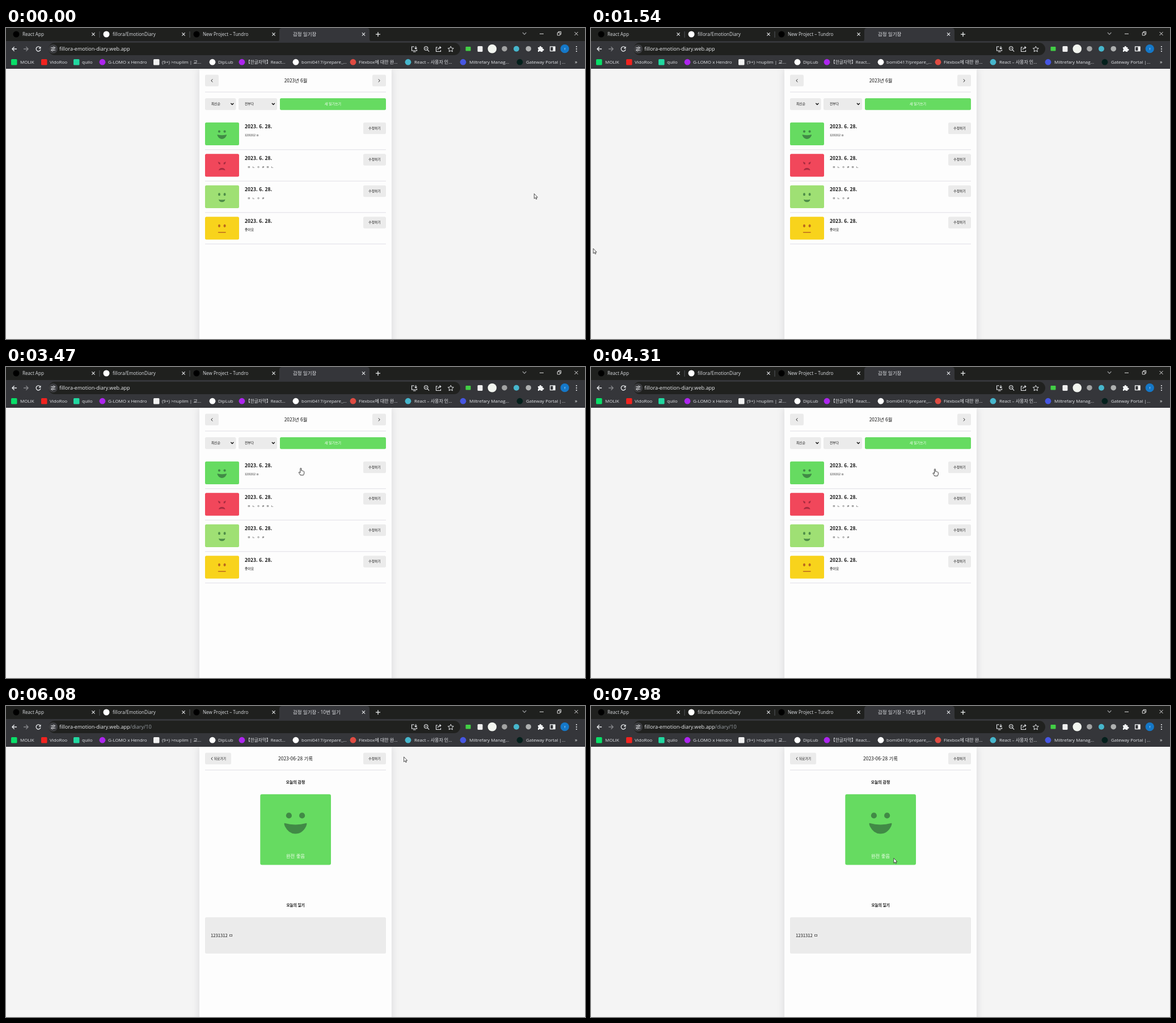
An HTML page that plays this animation: 1021x549 px, repeating every 8 s.

```html
<!DOCTYPE html>
<html lang="ko">
<head>
<meta charset="utf-8">
<title>감정 일기장</title>
<style>
  html, body { margin: 0; width: 100%; height: 100%; overflow: hidden; background: #f4f4f4; }
  svg { display: block; width: 1021px; height: 549px; }
  text { font-family: "Open Sans", "Noto Sans CJK KR", "Noto Sans CJK", sans-serif; white-space: pre; }
  .page text { font-family: "Noto Sans CJK KR", "Noto Sans CJK", sans-serif; }
</style>
</head>
<body>
<svg id="stage" viewBox="0 0 1021 549"></svg>
<script>
const LOOP = 8000, OPEN_AT = 4620;
const GREY = '#ebebeb', GREEN = '#66db61', INK = '#111';

const rect = (x, y, w, h, fill, r = 0) =>
  `<rect x="${x}" y="${y}" width="${w}" height="${h}" rx="${r}" fill="${fill}"/>`;
const dot = (x, y, r, fill) => `<circle cx="${x}" cy="${y}" r="${r}" fill="${fill}"/>`;
const line = (d, color = '#e8e8e8', w = 1.2) =>
  `<path d="${d}" fill="none" stroke="${color}" stroke-width="${w}"/>`;
const text = (x, y, s, size, fill = INK, attrs = '') =>
  `<text x="${x}" y="${y}" font-size="${size}" fill="${fill}" ${attrs}>${s}</text>`;
const label = (x, y, s, size, fill = INK, weight = 400) =>
  text(x, y, s, size, fill, `text-anchor="middle" font-weight="${weight}"`);
const rule = y => rect(351, y - .6, 319, 1.3, '#e6e5ea');

// Browser frame
function tabBar() {
  const tabs = [[18, 'React App', '#000'], [177, 'fillora/EmotionDiary', '#fff'], [336, 'New Project – Tundro', '#000']];
  return rect(0, 0, 1021, 24, '#1f201e') +
    '<path d="M478 24Q482 24 482 19V5Q482 0 487 0H636Q641 0 641 5V19Q641 24 645 24Z" fill="#35363a"/>' +
    tabs.map(([x, s, c]) => dot(x, 11, 5.5, c) + text(x + 11, 14, s, 8.1, '#dadce0')).join('') +
    text(506, 14, '', 8.5, '#e4e6ea', 'id="tabTitle"') +
    [154, 313, 472, 630.5].map(x => line(`M${x - 2.6} 8.4l5.2 5.2m0-5.2l-5.2 5.2`, '#e8eaed', 1.1)).join('') +
    line('M165 6V17M324 6V17', '#55575b', 1) +
    line('M656 7.2v8M652 11.2h8', '#f1f3f4', 1.3) +
    line('M911 8l3.2 3.3l3.2-3.3', '#9a9b9d') +
    line('M941 10.3h7M972.3 8.3h4.6v4.6h-4.6zM974 8v-1.6h4.7v4.8H977M1002.6 7l6 6m0-6l-6 6', '#e0e0e0', 1);
}

function toolBar() {
  const white = '#e8eaed';
  return rect(0, 23, 1021, 49, '#35363a') + rect(75, 26, 726, 22, '#20211f', 11) +
    line('M19 37h-8m3.7-3.8L10.9 37l3.8 3.8', white, 1.3) +
    line('M31 37h8m-3.7-3.8l3.8 3.8l-3.8 3.8', '#85868a', 1.3) +
    line('M60.2 34.4A4 4 0 1 0 61 38', white, 1.3) + '<path d="M61.5 32.5v4h-4z" fill="#e8eaed"/>' +
    dot(83, 37, 8, '#3c3d40') +
    line('M79 35h3.4M85.8 35h1.4M79 39h1M83.6 39h3.6', white, 1.1) +
    '<g fill="none" stroke="#e8eaed"><circle cx="84.2" cy="35" r="1.5"/><circle cx="81.8" cy="39" r="1.5"/></g>' +
    text(94, 40.3, 'fillora-emotion-diary.web.app<tspan id="path" fill="#9aa0a6"></tspan>', 9.05, '#eceef0') +
    line('M720 33h-4.5v7h9v-2M718 42h4.5M722.7 32v5m-2-2l2 2l2-2', white, 1.1) +
    '<circle cx="740.7" cy="36" r="3.2" fill="none" stroke="#e8eaed" stroke-width="1.1"/>' +
    line('M743 38.4l3.2 3.2M739.2 36h3', white, 1.2) +
    line('M761 34h-2.5v7.5h8V39M761.5 38.5q.4-4 5-4m-2-2l2.4 2l-2.4 2', white, 1.1) +
    '<path d="M784.3 32.3l1.5 3.2l3.5.4l-2.6 2.4l.7 3.5l-3.1-1.8l-3.1 1.8l.7-3.5l-2.6-2.4l3.5-.4z" fill="none" stroke="#e8eaed"/>' +
    rect(810.5, 33, 9, 7.5, '#42cf45', 1) + rect(831.5, 32, 9, 10, '#eee', 1.5) +
    dot(857.3, 36.7, 7.8, '#f2f5ef') + dot(879, 36.7, 4.8, '#a2a3a3') +
    dot(900, 36.7, 5, '#46b6cc') + dot(921.3, 36.7, 4.8, '#aeb0b0') +
    '<path d="M938 34h2.7a1.7 1.7 0 1 1 3.3 0h2.3v2.8a1.7 1.7 0 1 1 0 3.2v2H943a1.6 1.6 0 0 0-3.1 0H938v-2.8a1.7 1.7 0 0 0 0-3z" fill="#f1f3f4"/>' +
    '<rect x="959.6" y="33" width="8.4" height="7.6" fill="none" stroke="#f1f3f4" stroke-width="1.3"/>' + rect(964.5, 33, 4, 7.6, '#f1f3f4') +
    dot(985.3, 36.7, 7.6, '#1578c8') + label(985.3, 38.5, 'f', 5, '#fff') +
    [33, 37, 41].map(y => dot(1006, y, 1.1, white)).join('');
}

function bookmarks() {
  const items = [
    [14, 'MOLIK', '#09df68', 1], [67, 'VidoRoo', '#f2231f', 1], [124, 'quilo', '#22d8a0', 1],
    [170, 'G-LOMO x Hendro', '#ad25ee'], [265, '(9+) &gt;nuplim | 교...', '#f1f1f1', 1],
    [364, 'DipLub', '#fff'], [416, '【한글자막】React...', '#ad25ee'],
    [511, 'bomi0417/prepare_...', '#fff'], [612, 'Flexbox에 대한 완...', '#df4b42'],
    [709, 'React – 사용자 인...', '#46b6cc'], [806, 'Miltrefary Manag...', '#4656e2'],
    [906, 'Gateway Portal |...', '#04201c']];
  const starts = [25, 77, 134, 180, 275, 374, 423, 521, 622, 720, 817, 917];
  return items.map(([x, s, c, square], i) =>
    (square ? rect(x - 5, 55, 10.5, 10.5, c, 1.5) : dot(x, 60.2, 5.4, c)) +
    text(starts[i], 63, s, i === 6 ? 7.7 : 8, '#e4e6ea')).join('') +
    text(1003, 63, '»', 9, '#f1f3f4');
}

// Faces are drawn around the centre of the eyes and mouth
const faces = {
  great: '<circle cx="-4.8" cy="-4.5" r="2.1"/><circle cx="4.8" cy="-4.5" r="2.1"/><path d="M-8 1Q0 3.2 8 1Q8.6 1.3 7.7 3.4Q5 8.8 0 8.8T-7.7 3.4Q-8.6 1.3-8 1Z"/>',
  awful: '<path d="M-7-6.6L-3-5V-2Q-5.8-1.8-6.2-4ZM7-6.6L3-5V-2Q5.8-1.8 6.2-4ZM-5.7 8.2Q-4.6 4.2 0 4.2T5.7 8.2Q5.4 8.8 4.6 8.3Q0 6.6-4.6 8.3Q-5.4 8.8-5.7 8.2Z"/>',
  good: '<ellipse cx="-4.8" cy="-4.5" rx="2" ry="2.6"/><ellipse cx="4.8" cy="-4.5" rx="2" ry="2.6"/><path d="M-5.7 4.2Q0 6 5.7 4.2Q5 9 0 9T-5.7 4.2Z"/>',
  okay: '<ellipse cx="-4.8" cy="-4.5" rx="2" ry="2.7"/><ellipse cx="4.8" cy="-4.5" rx="2" ry="2.7"/><rect x="-7" y="6.2" width="14" height="1.7" rx=".8"/>'
};
const face = (kind, x, y, scale, fill) =>
  `<g transform="translate(${x} ${y}) scale(${scale})" fill="${fill}">${faces[kind]}</g>`;
const editButton = y => rect(630, y, 40, 20.5, GREY, 2.5) + label(650, y + 12.2, '수정하기', 5.8);

function listPage() {
  const rows = [
    ['great', GREEN, '#418a46', '1231312 ㅁ', 4.9, 0],
    ['awful', '#f1475b', '#a82c40', ' ㅁㄴㅇㄹㅁㄴ', 5, 3.7],
    ['good', '#9fe074', '#4f8e49', ' ㅁㄴㅇㄹ', 5, 3.7],
    ['okay', '#f8d31c', '#ba681f', '좋아요', 5.8, 0]];
  return rect(351, 82.5, 24, 20.5, GREY, 2.5) + rect(646, 82.5, 24, 20.5, GREY, 2.5) +
    line('M364.3 90.3l-2.4 2.6l2.4 2.6M656.8 90.3l2.4 2.6l-2.4 2.6', '#222', 1) +
    label(511, 96.3, '2023년 6월', 8.3) + rule(113) +
    rect(351, 124, 54.5, 20.7, GREY, 2.5) + text(362, 136.2, '최신순', 5.8) +
    rect(410, 124, 68, 20.7, GREY, 2.5) + text(421, 136.2, '전부다', 5.8) +
    line('M396.4 132.7l2.5 2.5l2.5-2.5M468.9 132.7l2.5 2.5l2.5-2.5', INK, 1.4) +
    rect(483, 124, 187, 20.7, GREEN, 2.5) + label(576.5, 136.2, '새 일기쓰기', 6, '#fff') +
    rows.map(([kind, color, dark, note, size, gap], i) => {
      const y = 166.7 + 55.5 * i;
      return rect(351, y, 60, 40.3, color, 2.5) + face(kind, 380.8, y + 20.5, 1, dark) +
        text(421, y + 10.4, '2023. 6. 28.', 8.5, INK, 'font-weight="700"') +
        text(421, y + 24.3, note, size, INK, `letter-spacing="${gap}"`) +
        editButton(y) + rule(y + 48);
    }).join('');
}

function detailPage() {
  return rect(351, 82.5, 46, 20.5, GREY, 2.5) + line('M364.2 90.3l-2.2 2.6l2.2 2.6', '#222', .9) +
    text(367, 94.9, '뒤로가기', 5.7) + label(510.5, 96.2, '2023-06-28 기록', 8.4) + editButton(82.5) + rule(113) +
    label(510.5, 137.4, '오늘의 감정', 6.9, INK, 700) +
    rect(448.3, 155.7, 124.7, 124.8, GREEN, 3) + face('great', 510.5, 204.3, 2.42, '#418a46') +
    label(510.5, 267.8, '완전 좋음', 8.4, '#f4fff0') +
    label(510.5, 354.4, '오늘의 일기', 6.6, INK, 700) +
    rect(351, 373, 319, 64, GREY, 2.5) +
    text(361, 407.6, '1231312 ㅁ', 7.7);
}

const $ = id => document.getElementById(id);
$('stage').innerHTML =
  '<defs><filter id="soft" x="-10%" y="-10%" width="120%" height="120%"><feGaussianBlur stdDeviation="7"/></filter></defs>' +
  rect(0, 0, 1021, 549, '#f4f4f4') +
  `<g filter="url(#soft)" opacity=".2">${rect(341, 72, 339, 490, '#64646f')}</g>` +
  rect(341, 72, 339, 477, '#fdfdfd') +
  `<g class="page" id="list">${listPage()}</g><g class="page" id="detail">${detailPage()}</g>` +
  tabBar() + toolBar() + bookmarks() +
  `<g id="cursor" stroke-linejoin="round">
    <path id="arrow" d="M.3.3V9L2.3 7.2L3.7 10.1L5 9.5L3.7 6.7H6.3Z" fill="#fff" stroke="#222" stroke-width=".8"/>
    <path id="hand" d="M-1 1Q0-.4 1 1V5Q2 4.2 2.8 5.4Q4 4.8 4.6 6Q5.8 5.8 5.8 7.2V9.4Q5.6 11 4.6 12.8H-.8Q-1.7 10.6-3.4 8.8Q-4 7.4-2.4 7.4L-1 8.6Z" fill="#fff" stroke="#222" stroke-width=".9"/>
  </g>`;

// Pointer stops: time, x, y
const stops = [
  [0, 931.3, 292], [420, 760, 420], [850, 300, 503], [1250, 3, 430], [1540, 3.7, 389], [1710, 15, 384],
  [2150, 270, 270], [2540, 460, 175], [3400, 515, 178], [4310, 606.5, 179.5], [OPEN_AT, 585, 195],
  [5140, 529.3, 334], [5600, 600, 215], [6080, 701.3, 89.5], [6700, 670, 130], [7400, 570, 235], [8000, 532.8, 269]];

function pointer(t) {
  let i = 0;
  while (i < stops.length - 2 && t >= stops[i + 1][0]) i++;
  const a = stops[i], b = stops[i + 1], u = (t - a[0]) / (b[0] - a[0]);
  const k = u * u * (3 - 2 * u) * .4 + u * .6;
  return [a[1] + (b[1] - a[1]) * k, a[2] + (b[2] - a[2]) * k];
}

function draw(now) {
  const t = now % LOOP, opened = t >= OPEN_AT, [x, y] = pointer(t);
  const onRow = !opened && x > 351 && x < 670 && y > 166 && y < 374;
  const show = (id, on) => $(id).setAttribute('display', on ? 'inline' : 'none');
  show('list', !opened);
  show('detail', opened);
  show('hand', onRow);
  show('arrow', !onRow);
  $('tabTitle').textContent = opened ? '감정 일기장 - 10번 일기' : '감정 일기장';
  $('path').textContent = opened ? '/diary/10' : '';
  $('cursor').setAttribute('transform', `translate(${x.toFixed(1)} ${y.toFixed(1)})`);
}

const start = performance.now();
function tick() {
  draw(performance.now() - start);
  requestAnimationFrame(tick);
}
tick();
</script>
</body>
</html>
```
